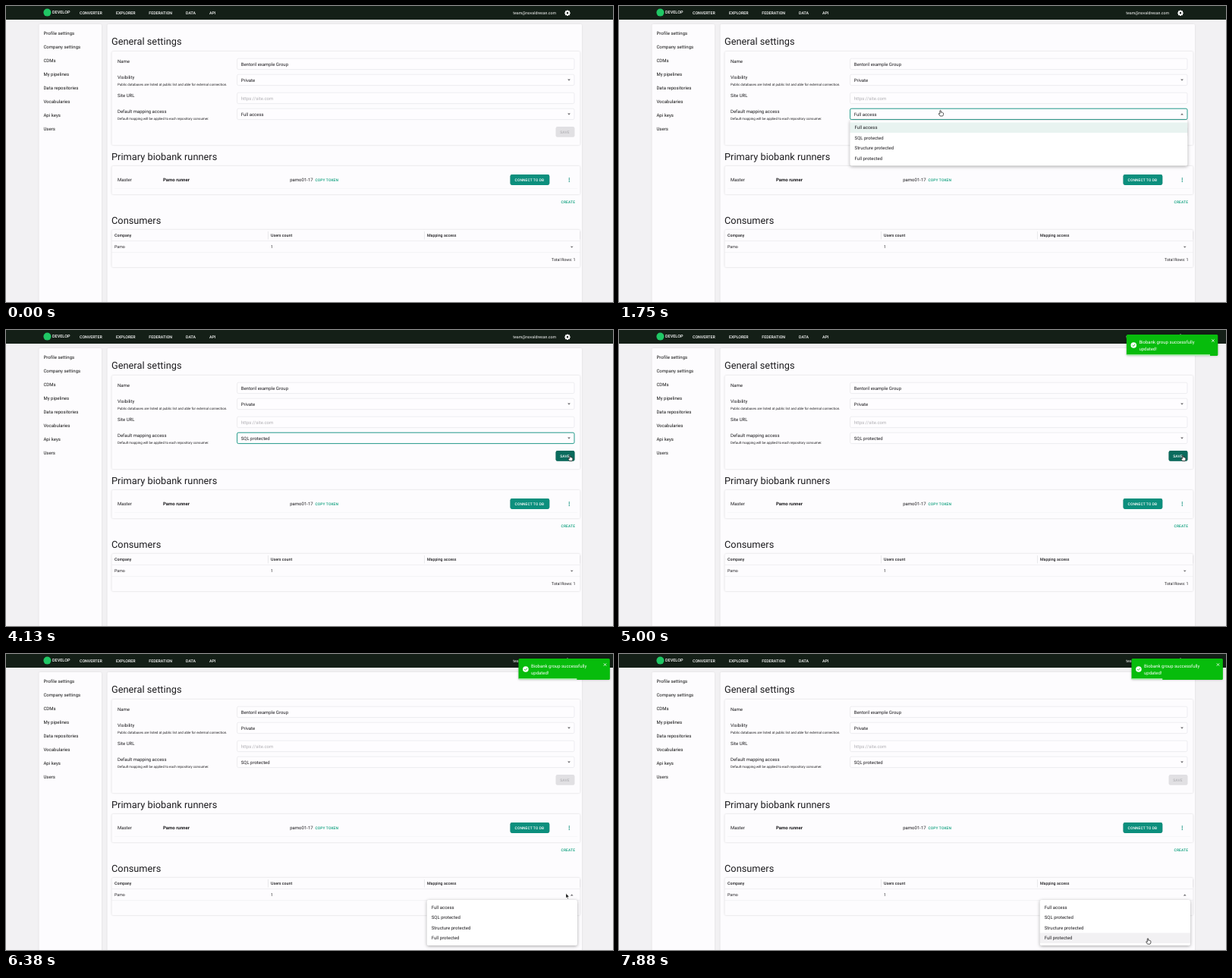
These frames come from a looping animation (800 px wide and 390 px high, 8 s). An HTML page:

```html
<!DOCTYPE html>
<html lang="en">
<head>
<meta charset="utf-8">
<title>Group settings</title>
<style>
html, body { margin: 0; width: 100%; height: 100%; overflow: hidden; background: #f2f1f3; }
svg { display: block; width: 100%; height: 100%; }
text { font-family: Roboto, Arial, sans-serif; font-size: 6px; fill: #1c1b1e; text-rendering: geometricPrecision; white-space: pre; }
.title { font-size: 12.75px; letter-spacing: .03px; }
.side { letter-spacing: .03px; fill: #111; }
.hint { font-size: 4.46px; }
.nav { font-size: 5.25px; font-weight: 500; fill: #fff; }
.cell { font-size: 5.25px; }
.head { font-size: 5.25px; font-weight: 500; }
.btn { font-size: 4.875px; font-weight: 500; letter-spacing: .14px; fill: #fff; }
.link { fill: #0b9f7c; }
.card { fill: #fdfcfe; filter: drop-shadow(0 .8px 1px rgba(0,0,0,.17)); }
.panel { fill: #fdfcfe; filter: drop-shadow(0 0 1.2px rgba(0,0,0,.09)); }
.raised { filter: drop-shadow(0 .7px .7px rgba(0,0,0,.3)); }
.menu { fill: #fff; filter: drop-shadow(0 1.5px 2px rgba(0,0,0,.35)); }
.toast { fill: #07bc0c; filter: drop-shadow(0 .5px 1.5px rgba(0,0,0,.25)); }
</style>
</head>
<body>
<svg id="stage" viewBox="0 0 800 390" preserveAspectRatio="none"></svg>
<script>
const LOOP = 8000;
const TEAL = '#0c8f7d';
const LEVELS = ['Full access', 'SQL protected', 'Structure protected', 'Full protected'];

const text = (x, y, str, cls = '', extra = '') =>
  `<text x="${x}" y="${y}" class="${cls}" ${extra}>${str}</text>`;
const rect = (x, y, w, h, fill, r = 0, extra = '') =>
  `<rect x="${x}" y="${y}" width="${w}" height="${h}" rx="${r}" fill="${fill}" ${extra}/>`;
const arrow = (x, y, id = '') =>
  `<path id="${id}" transform="translate(${x} ${y})" d="M-1.9-.9H1.9L0 1Z" fill="#626165"/>`;
const field = (y, id = '') =>
  rect(304.6, y, 444.4, 14.4, '#fefdff', 1.8, `id="${id}" stroke="#dddce0" stroke-width=".5"`);

function header() {
  const items = [[97, 'CONVERTER'], [145, 'EXPLORER'], [188.3, 'FEDERATION'], [237, 'DATA'], [268, 'API']];
  let teeth = '';
  for (let i = 0; i < 8; i++)
    teeth += rect(-.9, -3.8, 1.8, 2, '#fff', .4, `transform="rotate(${i * 45})"`);
  return rect(0, 0, 800, 18, '#141f17', 0, 'class="raised"') +
    '<circle cx="54.4" cy="8.6" r="5" fill="#20c765"/>' +
    text(61, 10.3, 'DEVELOP', 'nav', 'style="font-size:5.5px"') +
    items.map(([x, s]) => text(x, 10.6, s, 'nav')).join('') +
    text(668.3, 10.8, 'team@novaldresan.com', 'nav', 'style="font-weight:400"') +
    `<g transform="translate(740 9.3)">${teeth}<circle r="2.1" fill="none" stroke="#fff" stroke-width="1.7"/></g>`;
}

function sidebar() {
  const items = ['Profile settings', 'Company settings', 'CDMs', 'My pipelines', 'Data repositories',
    'Vocabularies', 'Api keys', 'Users'];
  return rect(43.5, 24, 82.5, 372, '', 1.5, 'class="panel"') +
    items.map((s, i) => text(49.4, 38 + 18 * i, s, 'side')).join('');
}

function general() {
  return text(139, 51.2, 'General settings', 'title') +
    rect(139.5, 60, 617, 123, '', 1.5, 'class="card"') +
    text(147, 75.3, 'Name') + text(147, 96.3, 'Visibility') +
    text(147, 105.3, 'Public databases are listed at public list and able for external connection.', 'hint') +
    text(147, 120.3, 'Site URL') + text(147, 141.4, 'Default mapping access') +
    text(147, 150.4, 'Default mapping will be applied to each repository consumer.', 'hint') +
    field(69.2) + field(90.2) + field(114.2) + field(135.2, 'access') +
    text(309.7, 78.6, 'Bentoril example Group') + text(309.7, 99.5, 'Private') +
    text(309.7, 123.5, 'https://site.com', '', 'style="fill:#b0afb3"') +
    text(309.7, 144.5, '', '', 'id="level"') +
    arrow(742, 97.5) + arrow(742, 142.5, 'fieldArrow') +
    rect(724.5, 159, 25, 13.8, '', 2.4, 'id="save"') + text(730.3, 167.7, 'SAVE', 'btn', 'id="saveText"');
}

function runners() {
  const dots = [226.9, 229.1, 231.3].map(y => `<circle cx="742.3" cy="${y}" r=".75" fill="${TEAL}"/>`).join('');
  return text(139, 202.8, 'Primary biobank runners', 'title') +
    rect(139.5, 211, 617, 37, '', 1.5, 'class="card"') +
    rect(143, 240, 610, .4, '#eeedf0') +
    text(147, 231.1, 'Master') + text(207, 231.1, 'Pamo runner', '', 'font-weight="700"') +
    text(374.2, 231.1, 'pamo01-17') + text(407.5, 230.8, 'COPY TOKEN', 'btn link') +
    rect(664.5, 222, 51.8, 14, TEAL, 2.4, 'class="raised"') + text(670.6, 230.8, 'CONNECT TO DB', 'btn') + dots +
    text(731.6, 259.7, 'CREATE', 'btn link');
}

function consumers() {
  return text(139, 287.4, 'Consumers', 'title') +
    rect(139.5, 295, 617, 49, '', 1.5, 'class="card"') +
    [345, 551, 756.5].map(x => rect(x, 297, .6, 10.5, '#dddce0')).join('') +
    rect(139.5, 309.3, 617, .5, '#e2e1e5') + rect(139.5, 324.6, 617, .5, '#e6e5e9') +
    text(143, 304, 'Company', 'head') + text(349, 304, 'Users count', 'head') +
    text(555, 304, 'Mapping access', 'head') +
    text(143, 319.2, 'Pamo', 'cell') + text(349, 319.2, '1', 'cell') +
    arrow(745.7, 317.6, 'rowArrow') + text(719, 336.3, 'Total Rows: 1', 'cell');
}

const menu = (id, x, y, w) => `<g id="${id}">` +
  rect(x, y, w, 60, '', 1.8, 'class="menu"') +
  LEVELS.map((s, i) => rect(x, y + 3 + 13.5 * i, w, 13.5, '#fff', 0, 'class="item"') +
    text(x + 6, y + 11.9 + 13.5 * i, s)).join('') + '</g>';

const toast = () => '<g id="toast">' +
  rect(675.5, 6, 120.4, 28, '', 1.5, 'class="toast"') +
  rect(675.5, 32.2, 120.4, 1.8, 'rgba(255,255,255,.7)', 0, 'id="bar"') +
  '<circle cx="684.9" cy="20" r="3.8" fill="#fff"/>' +
  '<path d="M683.1 20.1l1.3 1.3 2.5-2.7" fill="none" stroke="#07bc0c" stroke-width=".9"/>' +
  '<path d="M787.8 12.3l3.4 3.4m0-3.4l-3.4 3.4" stroke="#fff" stroke-width=".8"/>' +
  text(692, 18, 'Biobank group successfully', '', 'style="fill:#fff"') +
  text(692, 27, 'updated!', '', 'style="fill:#fff"') + '</g>';

const pointers = () =>
  `<path id="hand" fill="#fff" stroke="#111" stroke-width=".7" stroke-linejoin="round"
    d="M-.7.5Q0-.5.7.5V2.8L1.5 2.5 2.2 3 3 2.9 3.9 3.7V5.2Q3.9 6.5 3 7.6H-.4L-2.2 5Q-2.4 4 -1.5 4.2L-.7 4.8Z"/>
  <path id="point" fill="#000" stroke="#fff" stroke-width=".5" d="M0 0V6L1.3 4.8 2.2 6.9 3.2 6.5 2.3 4.4H4.2Z"/>`;

document.getElementById('stage').innerHTML =
  rect(0, 0, 800, 390, '#f2f1f3') + sidebar() + rect(133.5, 24, 625.5, 372, '', 1.5, 'class="panel"') +
  general() + runners() + consumers() + header() +
  menu('menuA', 304.6, 150.5, 444.6) + menu('menuB', 554.8, 324, 198) + toast() + pointers();

const el = {};
document.querySelectorAll('[id]').forEach(n => { if (n.id) el[n.id] = n; });
const set = (id, attrs) => { for (const k in attrs) el[id].setAttribute(k, attrs[k]); };

const clamp = v => Math.max(0, Math.min(1, v));
const prog = (t, a, b) => clamp((t - a) / (b - a));
const smooth = p => p * p * (3 - 2 * p);
const easeOut = p => 1 - (1 - p) ** 3;

// time, x, y of the pointer tip
const path = [[1130, 432, 190], [1400, 423.6, 137.4], [2000, 423.6, 137.4], [2380, 411.6, 171],
  [3560, 411.6, 171], [4050, 743, 165], [5380, 743, 165], [6100, 738, 315.5], [6550, 738, 315.5],
  [7000, 716, 346], [7130, 716, 346], [7650, 697, 374.6]];

function pointerAt(t) {
  let i = path.findIndex(k => k[0] > t);
  if (i < 0) return path[path.length - 1].slice(1);
  if (i === 0) i = 1;
  const [a, b] = [path[i - 1], path[i]];
  const p = smooth(prog(t, a[0], b[0]));
  return [a[1] + (b[1] - a[1]) * p, a[2] + (b[2] - a[2]) * p];
}

function showMenu(id, alpha, x, y, w, selected, mx, my) {
  el[id].style.display = alpha > 0 ? '' : 'none';
  el[id].style.opacity = alpha;
  const over = mx > x && mx < x + w ? Math.floor((my - y - 3) / 13.5) : -1;
  el[id].querySelectorAll('.item').forEach((n, i) =>
    n.setAttribute('fill', i === selected ? '#e8f3f0' : i === over ? '#f2f1f3' : '#fff'));
}

// bounce in from the right edge
function toastShift(t) {
  const keys = [[0, 1125], [.6, -9.4], [.75, 3.75], [.9, -1.9], [1, 0]];
  const p = prog(t, 4573, 5273);
  if (p >= 1) return 0;
  const i = keys.findIndex(k => k[0] > p);
  const [a, b] = [keys[i - 1], keys[i]];
  return a[1] + (b[1] - a[1]) * easeOut(prog(p, a[0], b[0]));
}

function draw(t) {
  const [x, y] = pointerAt(t);
  const openA = t >= 1500 && t < 2750;
  const openB = t >= 6250;
  const focus = t >= 1500 && t < 4440;
  const enabled = t >= 2750 && t < 5380;
  const hover = enabled && x > 724 && y > 159 && y < 173;

  set('access', { stroke: focus ? TEAL : '#dddce0', 'stroke-width': focus ? .9 : .5 });
  el.level.textContent = LEVELS[t >= 2750 ? 1 : 0];
  set('fieldArrow', { transform: `translate(742 142.5) scale(1 ${openA ? -1 : 1})` });
  set('rowArrow', { transform: `translate(745.7 317.6) scale(1 ${openB ? -1 : 1})` });
  set('save', { fill: hover ? '#0a6b5d' : enabled ? TEAL : '#e1e0e3', class: enabled ? 'raised' : '' });
  el.saveText.style.fill = enabled ? '#fff' : '#b3b2b6';

  const alphaA = openA ? prog(t, 1500, 1700) : t >= 2750 ? 1 - prog(t, 2750, 2950) : 0;
  showMenu('menuA', alphaA, 304.6, 150.5, 444.6, t < 2750 ? 0 : 1, x, y);
  showMenu('menuB', openB ? prog(t, 6250, 6370) : 0, 554.8, 324, 198, -1, x, y);

  el.toast.style.display = t >= 4573 ? '' : 'none';
  set('toast', { transform: `translate(${toastShift(t)} 0)` });
  set('bar', { width: 120.4 * (1 - prog(t, 4573, 9573)) });

  const shown = t >= 1130;
  const hand = t < 3700 ? y < 180 : t < 5440 ? hover : openB && y > 327;
  el.hand.style.display = shown && hand ? '' : 'none';
  el.point.style.display = shown && !hand ? '' : 'none';
  set('hand', { transform: `translate(${x} ${y})` });
  set('point', { transform: `translate(${x} ${y})` });
}

const start = performance.now();
function tick() {
  draw((performance.now() - start) % LOOP);
  requestAnimationFrame(tick);
}
tick();
</script>
</body>
</html>
```
